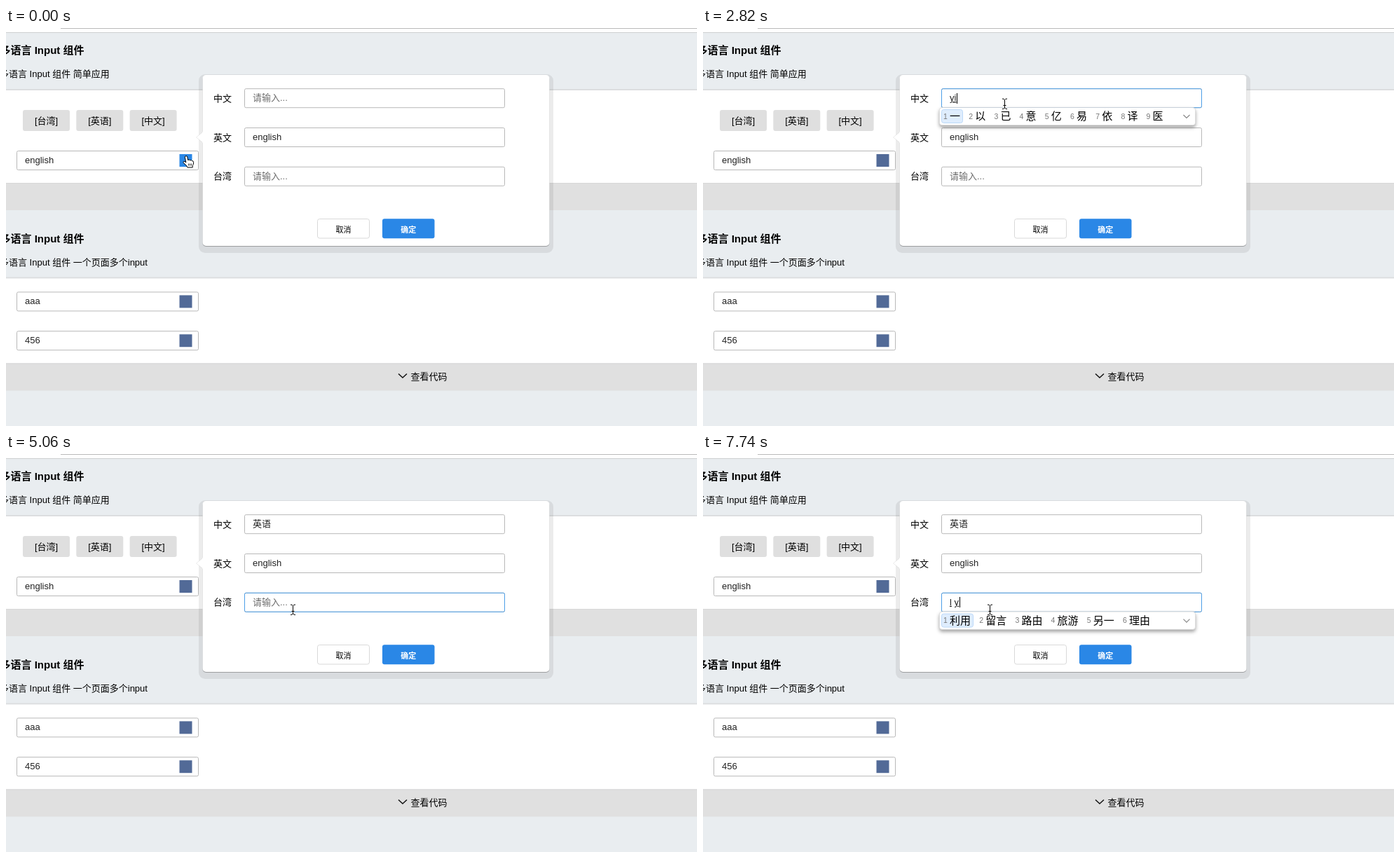
Animation of 986x568 px, one loop 8000 ms. Source, as an HTML page:

```html
<!DOCTYPE html>
<html lang="zh-CN">
<head>
<meta charset="utf-8">
<title>多语言 Input 组件</title>
<style>
  html, body { margin: 0; width: 100%; height: 100%; overflow: hidden; background: #e9edf0; }
  svg { display: block; width: 986px; height: 568px; }
  text { font: 13px "Liberation Sans", "Noto Sans CJK SC", "Noto Sans CJK", sans-serif; fill: #000; white-space: pre; }
  .title { font-size: 15px; font-weight: bold; }
  .mid { text-anchor: middle; }
  .value { fill: #222; }
  .hint { fill: #6c6c6c; }
  .small { font-size: 11px; }
  .box { fill: #fff; stroke: #b8b8b8; }
  .focus { fill: none; stroke: #4c9fe8; }
  .icon { fill: #526a97; }
  .icon.hot { fill: #2a87e6; }
  .composing tspan { text-decoration: underline; }
  .num { font-size: 10.5px; fill: #777; }
  .cand { font-size: 15px; }
  #ime rect.panel { filter: drop-shadow(0 3px 2.5px rgba(0, 0, 0, .36)); }
  #popup { filter: drop-shadow(0 1px .6px rgba(0, 0, 0, .28)); }
</style>
</head>
<body>
<svg viewBox="0 0 986 568">
  <g id="page"></g>

  <rect x="275" y="66" width="506" height="255" rx="9" fill="#000" fill-opacity=".075"/>
  <rect id="popup" x="280.500" y="67" width="495" height="244" rx="5" fill="#fff"/>
  <path d="M281 148L271.500 156L281 164Z" fill="#fff"/>
  <path d="M280 149L271.500 156L280 163" fill="none" stroke="#000" stroke-opacity=".08"/>
  <g id="form"></g>

  <rect x="444.500" y="272.500" width="74" height="27.500" rx="3" fill="#fff" stroke="#d9d9d9"/>
  <text class="mid small" x="481.500" y="291.500">取消</text>
  <rect x="537" y="272.300" width="74.500" height="27.900" rx="3" fill="#2a87e6"/>
  <text class="mid small" x="574.300" y="291.500" style="fill:#fff;font-weight:bold">确定</text>

  <g id="ime">
    <rect class="panel" x="337.300" y="113.500" width="365.400" height="25.300" rx="4" fill="#fff" stroke="#d2d2d2" stroke-width=".7"/>
    <rect id="pick" x="340.500" y="116.500" height="19" rx="3" fill="#dfedfd" stroke="#bcd9f8"/>
    <g id="cands"></g>
    <path d="M685.500 124L690 128.500L694.500 124" fill="none" stroke="#888" stroke-width="1.200"/>
  </g>

  <g id="cursor">
    <g id="hand" fill="#fff" stroke="#000" stroke-linejoin="round">
      <path d="M-1.600 1.500Q-1.500-.5 0-.5Q1.500-.5 1.800 1.500L2.600 5.500Q4.500 4.300 5.600 5.800Q7.500 5 8.400 6.600Q10.400 6.200 10.600 8.500Q10.800 11.500 9.200 13.500V16H2Q1 13-3.600 9.600Q-4.800 8-3.200 7.400Q-1.800 7.200-.2 9Z"/>
      <path d="M3.500 10.500v3M5.500 10.500v3M7.500 10.500v3" stroke-width=".8"/>
    </g>
    <path id="arrow" d="M0 0V12.500L2.800 9.800L4.700 14.200L6.600 13.400L4.700 9.200H8.600Z" stroke="#fff"/>
    <g id="beam" fill="none">
      <path d="M-3-7Q0-7 .5-5.500Q1-7 4-7M.5-6V6M-3 7.500Q0 7.500 .5 6Q1 7.500 4 7.500M-1.500 2.500H2.500" stroke="#fff" stroke-width="2.200"/>
      <path d="M-3-7Q0-7 .5-5.500Q1-7 4-7M.5-6V6M-3 7.500Q0 7.500 .5 6Q1 7.500 4 7.500M-1.500 2.500H2.500" stroke="#000"/>
    </g>
  </g>
</svg>

<script>
const LOOP = 8000;
const $ = id => document.getElementById(id);
const rect = (x, y, w, h, fill, rx = 0) =>
  `<rect x="${x}" y="${y}" width="${w}" height="${h}" rx="${rx}" fill="${fill}"/>`;
const text = (x, y, str, cls = '', id = '') =>
  `<text id="${id}" x="${x}" y="${y}" class="${cls}">${str}</text>`;
const box = (x, y, w, cls = 'box', id = '') =>
  `<rect id="${id}" class="${cls}" x="${x + .5}" y="${y + .5}" width="${w - 1}" height="27" rx="2"/>`;

const section = (y, height, subtitle) =>
  text(-8.5, y + 37, '多语言 Input 组件', 'title') +
  text(-9, y + 70, '多语言 Input 组件 ' + subtitle) +
  rect(0, y + 87, 986, 2, '#dcdee0') +
  rect(0, y + 89, 986, height, '#fff') +
  rect(0, y + 89 + height, 986, 39, '#e0e0e0') +
  rect(0, y + 89 + height, 986, 1, '#d8d8d8');

const langInput = (y, value, id = '') =>
  box(15, y, 260) + text(27, y + 18, value, 'value') +
  `<rect id="${id}" class="icon" x="247.500" y="${y + 5}" width="18" height="18"/>`;

$('page').innerHTML =
  rect(0, 0, 986, 6, '#fff') + rect(78, 0, 908, 1, '#b9b9b9') + rect(0, 6, 986, 1, '#cdcfd1') +
  section(0, 132, '简单应用') + section(268.5, 121, '一个页面多个input') +
  ['台湾', '英语', '中文'].map((name, i) =>
    rect(24 + i * 76.3, 117, 67, 30, '#dfdfdf', 3) +
    text(57.5 + i * 76.3, 136.5, `[${name}]`, 'mid')).join('') +
  langInput(175, 'english', 'icon') + langInput(376.4, 'aaa') + langInput(432.2, '456') +
  '<path d="M560 493.500L566 499L572 493.500" fill="none" stroke="#111" stroke-width="1.500"/>' +
  text(577.5, 501.5, '查看代码');

const formRow = (y, label, id, value = '') =>
  text(296, y + 18.5, label) + box(340, y, 372) +
  box(340, y, 372, 'focus', id + 'Focus') +
  text(352, y + 18, value, 'value', id);

$('form').innerHTML =
  formRow(86.2, '中文', 'zh') + formRow(142, '英文', 'en', 'english') + formRow(197.8, '台湾', 'tw') +
  '<rect id="caret" width="1" height="15" fill="#000"/>';
$('enFocus').style.opacity = 0;

const CANDIDATES = {
  'y': '有 一 要 也 以 用 又 由 与',
  'yi': '一 以 已 意 亿 易 依 译 医',
  'yin': '因 音 银 引 印 饮 隐 阴 殷',
  'ying': '应 赢 英 硬 影 迎 颖 营 営',
  'ying y': '英语 应用 营养 影院 硬要 盈余',
  'ying yu': '英语 盈余 应予 迎于 影域 硬玉',
  'l': '了 来 里 两 啦 老 拉 路 六',
  'li': '里 理 利 力 李 离 立 例 丽',
  'lin': '林 淋 临 琳 拎 霖 麟 凛 邻',
  'ling': '另 零 领 令 灵 玲 凌 铃 陵',
  'l y': '利用 留言 路由 旅游 另一 理由'
};

const move = (shape, x, y) => ({ shape, x, y });
// Each step: start time in ms, then what changes from the step before.
const steps = [
  [0, { ...move('hand', 257, 183), hot: true, zh: '', tw: '', typing: '', active: 'zh', zhFocus: 0, twFocus: 0, caret: false }],
  [140, move('hand', 261, 182)],
  [290, { ...move('arrow', 296, 170), hot: false }],
  [440, move('beam', 352, 147)],
  [590, move('arrow', 405, 119)],
  [740, move('beam', 430, 108)],
  [880, { zhFocus: .6, caret: true }],
  [1030, { zhFocus: 1 }],
  [1480, { caret: false }],
  [1780, { caret: true }],
  [2230, { caret: false }],
  [2530, { typing: 'y', caret: true }],
  [2820, { typing: 'yi' }],
  [2970, { typing: 'yin' }],
  [3120, { typing: 'ying' }],
  [3420, { typing: 'ying y' }],
  [3560, { typing: 'ying yu' }],
  [3860, { typing: '', zh: '英语' }],
  [4010, move('arrow', 427, 126)],
  [4160, move('arrow', 414, 188)],
  [4310, { ...move('beam', 409, 222), caret: false }],
  [4610, { active: 'tw', zhFocus: .4, twFocus: .6, caret: true }],
  [4760, { zhFocus: 0, twFocus: 1 }],
  [5060, { caret: false }],
  [5660, { caret: true }],
  [6110, { typing: 'l' }],
  [6260, { typing: 'li' }],
  [6410, { typing: 'lin' }],
  [6550, { typing: 'ling' }],
  [6850, { typing: 'lin' }],
  [7300, { typing: 'li' }],
  [7450, { typing: 'l' }],
  [7740, { typing: 'l y' }]
];
let last = {};
const states = steps.map(([, change]) => last = { ...last, ...change });

function drawField(id, value, typing) {
  const el = $(id);
  el.setAttribute('class', typing ? 'value composing' : value ? 'value' : 'hint');
  el.innerHTML = typing
    ? typing.split(' ').map(s => `<tspan>${s}</tspan>`).join(' ')
    : value || '请输入...';
}

function drawCandidates(typing, top) {
  $('ime').style.display = typing ? '' : 'none';
  if (!typing) return;
  $('ime').setAttribute('transform', `translate(0 ${top})`);
  const words = CANDIDATES[typing].split(' ');
  const size = 15 * words[0].length;
  $('pick').setAttribute('width', size + 15);
  $('cands').innerHTML = words.map((word, i) => {
    const x = 343 + i * (size + 21.2);
    const badge = word === '営';
    return text(x, 129.5, i + 1, 'num') + (badge
      ? rect(x + 9.5, 115.5, 18.5, 18.5, '#f39431', 3.5) +
        `<text x="${x + 18.7}" y="129.500" class="mid" style="fill:#fff">${word}</text>`
      : text(x + 9, 131, word, 'cand'));
  }).join('');
}

function draw(s) {
  const lower = s.active === 'tw';
  for (const id of ['zh', 'tw']) {
    drawField(id, s[id], id === s.active ? s.typing : '');
    $(id + 'Focus').style.opacity = s[id + 'Focus'];
  }
  drawCandidates(s.typing, lower ? 111.6 : 0);

  const filled = s.typing || s[s.active];
  const width = filled ? $(s.active).getComputedTextLength() + .6 : 0;
  $('caret').setAttribute('x', Math.round(352 + width));
  $('caret').setAttribute('y', lower ? 204 : 93);
  $('caret').style.display = s.caret ? '' : 'none';

  $('icon').classList.toggle('hot', s.hot);
  $('cursor').setAttribute('transform', `translate(${s.x} ${s.y})`);
  for (const shape of ['hand', 'arrow', 'beam'])
    $(shape).style.display = shape === s.shape ? '' : 'none';
}

let shown = -1;
function tick() {
  const t = performance.now() % LOOP;
  const index = steps.filter(([start]) => start <= t).length - 1;
  if (index !== shown) draw(states[shown = index]);
  requestAnimationFrame(tick);
}
tick();
</script>
</body>
</html>
```
